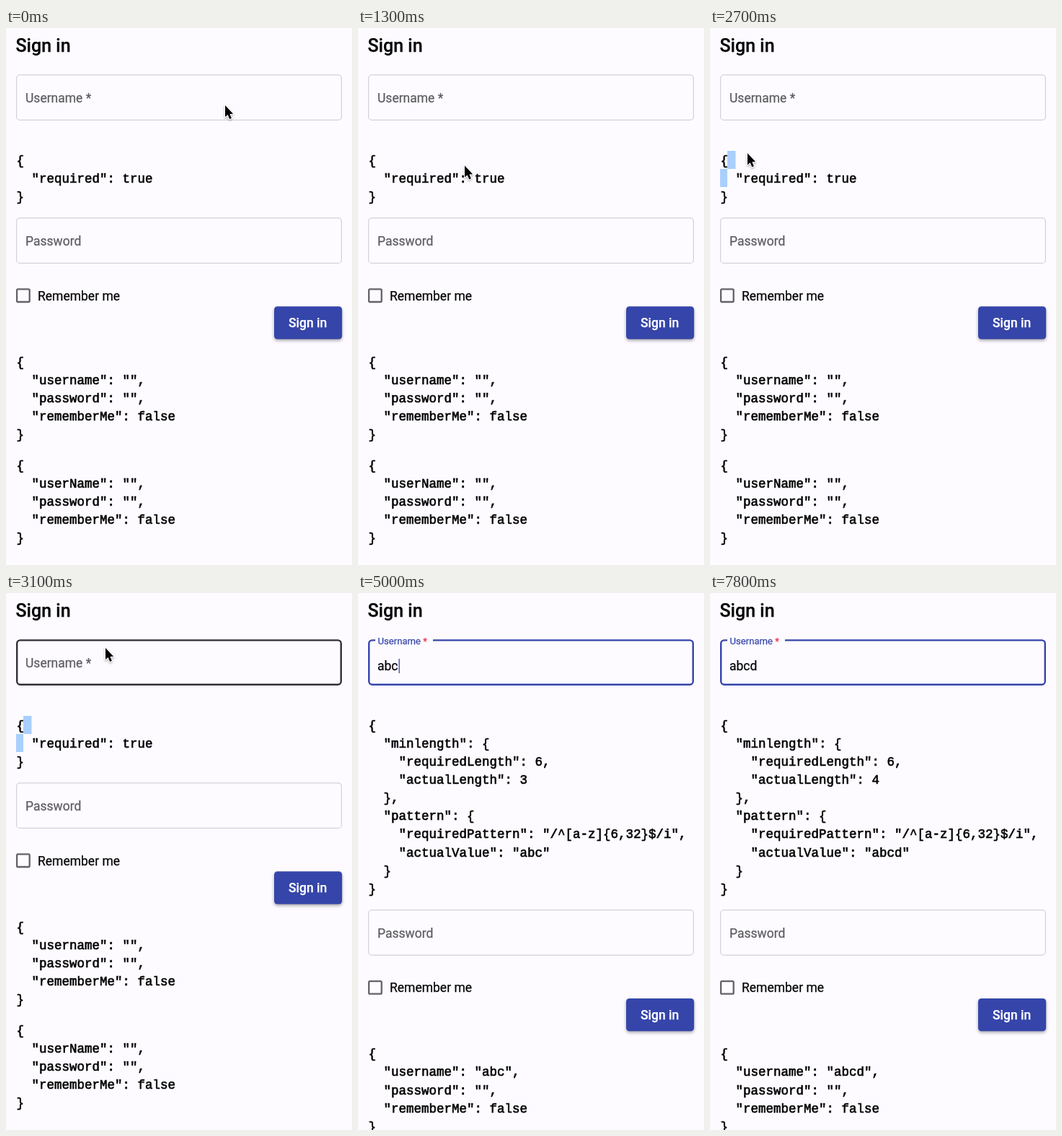
Write an HTML page with a canvas that moves like this. It is 480x743 px and loops after 8000 ms.

```html
<!DOCTYPE html>
<html lang="en">
<head>
<meta charset="utf-8">
<title>Sign in</title>
<style>
  html, body { margin: 0; width: 100%; height: 100%; overflow: hidden; background: #fdfbff; }
  canvas { display: block; width: 480px; height: 743px; }
</style>
</head>
<body>
<canvas id="stage"></canvas>
<script>
const W = 480, H = 743, LOOP = 8000, STEP = 100;
const LINE = 25.1, TEXT = 17.5;
const SANS = 'Roboto, sans-serif';
const MONO = '"Liberation Mono", "Courier New", monospace';
const BG = '#fdfbff', INK = '#050505', BLUE = '#3545a9', GREY = '#5e5d62';
const FOCUS = 3600;

const canvas = document.getElementById('stage');
const ctx = canvas.getContext('2d');
const dpr = window.devicePixelRatio || 1;
canvas.width = W * dpr;
canvas.height = H * dpr;

// Pointer stops: time, x, y
const path = [
  [100, 304, 107], [500, 252, 138], [800, 190, 170], [1000, 162, 186],
  [1200, 160, 187], [1300, 148, 190.5], [1700, 64, 189], [2000, 22, 186],
  [2200, 20.5, 186.5], [2400, 20.5, 206], [2600, 24, 204], [2900, 108, 112],
  [3100, 138, 76], [3500, 135, 91], [4100, 134, 93], [4300, 134, 94]
];
const typing = [[4300, 'a'], [4500, 'ab'], [4600, 'abc'], [5300, 'abcd']];

const mix = (a, b, p) => a + (b - a) * p;
const ease = p => p * p * (3 - 2 * p);

function pointerAt(t) {
  if (t <= path[0][0]) return { x: path[0][1], y: path[0][2] };
  const i = path.findIndex(s => s[0] >= t);
  const [t0, x0, y0] = path[i - 1], [t1, x1, y1] = path[i];
  const p = (t - t0) / (t1 - t0);
  return { x: mix(x0, x1, p), y: mix(y0, y1, p) };
}

// A hairline stroke gives the glyphs the heavier look of smoothed type.
function glyphs(str, x, y, color, font, heft) {
  ctx.font = font;
  ctx.fillStyle = ctx.strokeStyle = color;
  ctx.lineWidth = heft;
  ctx.lineJoin = 'round';
  ctx.fillText(str, x, y);
  ctx.strokeText(str, x, y);
}

function text(str, x, y, color = INK, size = TEXT, weight = 400) {
  glyphs(str, x, y, color, `${weight} ${size}px ${SANS}`, 0.25);
}

function json(value, y) {
  JSON.stringify(value, null, 2).split('\n').forEach((line, i) =>
    glyphs(line, 14.5, y + i * LINE, INK, `${TEXT}px ${MONO}`, 0.65));
}

function roundBox(x, y, w, h, r) {
  ctx.beginPath();
  ctx.roundRect(x, y, w, h, r);
}

function outline(y, color, width) {
  const i = width / 2;
  roundBox(14 + i, y + i, 452 - width, 63.7 - width, 4.5);
  ctx.strokeStyle = color;
  ctx.lineWidth = width;
  ctx.stroke();
}

function username(t, value, hover) {
  const focused = t >= FOCUS;
  const p = focused ? ease(Math.min(1, (t - FOCUS) / 150)) : 0;
  if (focused) outline(64.2, BLUE, 2.4);
  else if (hover) outline(64.2, '#313035', 2.4);
  else outline(64.2, '#d3d2d7', 1.2);

  if (p > 0) {
    ctx.fillStyle = BG;
    ctx.fillRect(24, 63, 80 * p, 6);
  }
  const size = mix(TEXT, TEXT * 0.75, p);
  const x = mix(27, 27.5, p), y = mix(103, 71, p);
  text('Username', x, y, focused ? BLUE : GREY, size);
  const starX = x + ctx.measureText('Username ').width;
  text('*', starX, y, focused ? '#ee3344' : GREY, size);
  if (!focused) return;

  if (value) text(value, 27, 107);
  else if (p === 1) text('Username', 27, 107, '#87868a');

  const since = typing.reduce((s, k) => t >= k[0] ? k[0] : s, FOCUS);
  if (Math.floor((t - since) / 500) % 2 === 0) {
    ctx.font = `${TEXT}px ${SANS}`;
    ctx.fillStyle = BLUE;
    ctx.fillRect(28 + ctx.measureText(value).width, 91, 1.3, 20);
  }
}

function lowerForm(dy) {
  outline(262.3 + dy, '#d3d2d7', 1.2);
  text('Password', 27, 301 + dy, GREY);

  roundBox(15.1, 361.4 + dy, 17.6, 17.6, 1.5);
  ctx.strokeStyle = '#636267';
  ctx.lineWidth = 2.3;
  ctx.stroke();
  text('Remember me', 44, 376.5 + dy);

  ctx.save();
  ctx.shadowColor = 'rgba(0,0,0,.35)';
  ctx.shadowBlur = 4 * dpr;
  ctx.shadowOffsetY = 2 * dpr;
  roundBox(372, 385.3 + dy, 94.2, 45.3, 4.5);
  ctx.fillStyle = BLUE;
  ctx.fill();
  ctx.restore();
  text('Sign in', 392, 414 + dy, '#fff', TEXT, 500);
}

function arrow(x, y) {
  ctx.save();
  ctx.translate(x, y);
  ctx.scale(0.87, 0.87);
  ctx.beginPath();
  [[0, 0], [0, 18.5], [4.2, 14.8], [7.2, 21.8], [10.2, 20.5], [7.3, 13.8], [12.8, 13.4]]
    .forEach(q => ctx.lineTo(...q));
  ctx.closePath();
  ctx.shadowColor = 'rgba(0,0,0,.3)';
  ctx.shadowBlur = 3 * dpr;
  ctx.shadowOffsetY = 1.5 * dpr;
  ctx.strokeStyle = '#fff';
  ctx.lineWidth = 2.4;
  ctx.lineJoin = 'round';
  ctx.stroke();
  ctx.shadowColor = 'transparent';
  ctx.fillStyle = '#000';
  ctx.fill();
  ctx.restore();
}

function beam(x, y) {
  ctx.save();
  ctx.translate(x, y);
  ctx.beginPath();
  for (const s of [-1, 1]) {
    ctx.moveTo(-4.3, s * 9.5);
    ctx.quadraticCurveTo(0, s * 9.5, 0, s * 6.5);
    ctx.quadraticCurveTo(0, s * 9.5, 4.3, s * 9.5);
  }
  ctx.moveTo(0, -7);
  ctx.lineTo(0, 7);
  ctx.moveTo(-2.2, 3.5);
  ctx.lineTo(2.2, 3.5);
  for (const [color, width] of [['#fff', 3.2], ['#111', 1.5]]) {
    ctx.strokeStyle = color;
    ctx.lineWidth = width;
    ctx.stroke();
  }
  ctx.restore();
}

function pointer(t, { x, y }) {
  const overInput = t >= 200 && y > 83 && y < 107;
  const overBrace = x < 25 && y > 171 && y < 246;
  const overKey = x > 35 && x < 204 && y > 196 && y < 220;
  if (overInput || overBrace || overKey) beam(x, y);
  else arrow(x, y);

  if ((t >= 2100 && t < 2500) || (t >= FOCUS && t < 3800)) {
    ctx.beginPath();
    ctx.arc(x, y, 20.5, 0, Math.PI * 2);
    ctx.strokeStyle = '#111';
    ctx.lineWidth = 1.8;
    ctx.stroke();
  }
}

function draw(t) {
  ctx.setTransform(dpr, 0, 0, dpr, 0, 0);
  ctx.fillStyle = BG;
  ctx.fillRect(0, 0, W, H);

  const value = typing.reduce((v, k) => t >= k[0] ? k[1] : v, '');
  const at = value ? null : pointerAt(t);
  const hover = at && t >= 200 && at.y > 65 && at.y < 128;
  const dy = value ? 7 * LINE : 0;

  text('Sign in', 13.5, 32.7, INK, 25, 500);
  username(t, value, hover);

  if (t >= 2400 && t < FOCUS) {
    ctx.fillStyle = '#a9cffc';
    ctx.fillRect(24, 170, 11.5, 25);
    ctx.fillRect(14, 195, 10, 25);
  }
  json(value ? {
    minlength: { requiredLength: 6, actualLength: value.length },
    pattern: { requiredPattern: '/^[a-z]{6,32}$/i', actualValue: value }
  } : { required: true }, 188.8);

  lowerForm(dy);
  json({ username: value, password: '', rememberMe: false }, 467.6 + dy);
  json({ userName: value, password: '', rememberMe: false }, 610.6 + dy);

  if (at) pointer(t, at);
}

const start = performance.now();
function tick() {
  const t = (performance.now() - start) % LOOP;
  draw(Math.floor(t / STEP) * STEP);
  requestAnimationFrame(tick);
}
tick();
</script>
</body>
</html>
```
